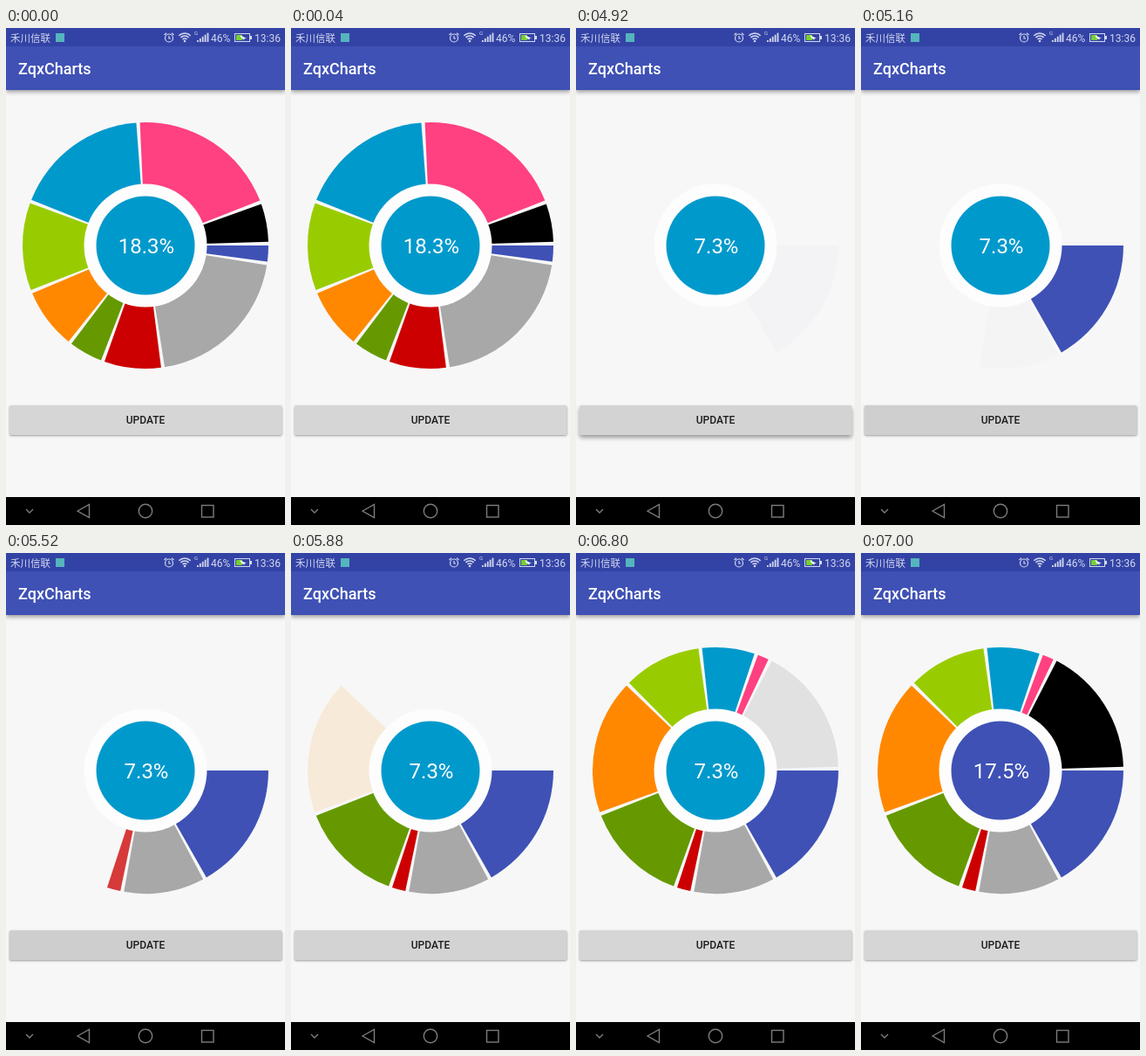
Write an HTML page with a canvas that moves like this. It is 320 px wide and 569 px high and loops after 8 s.

```html
<!DOCTYPE html>
<html lang="en">
<head>
<meta charset="utf-8">
<title>ZqxCharts</title>
<style>
html, body { margin: 0; width: 100%; height: 100%; overflow: hidden; background: #f7f7f7; }
canvas { display: block; width: 100%; height: 100%; }
</style>
</head>
<body>
<canvas id="stage"></canvas>
<script>
const W = 320, H = 569, LOOP = 8000;
const CX = 160, CY = 249, GAP = 1.7;
const PRESS = 4760, CLEAR = 4880, FADE_START = 4900, SLICE_MS = 232, SELECT = 7000;

const COLORS = ['#3f51b5', '#a8a8a8', '#cc0000', '#669900', '#ff8800',
                '#99cc00', '#0099cc', '#ff4081', '#000000'];
// Slice start angles in degrees, clockwise from three o'clock.
const BEFORE = [0, 9.2, 82.7, 111.2, 128.8, 158.8, 201.8, 267.4, 340.3, 360];
const AFTER = [0, 62, 101.8, 109.9, 160.2, 225.3, 263.7, 290.2, 297.2, 360];

const canvas = document.getElementById('stage');
const ctx = canvas.getContext('2d');
const scale = window.devicePixelRatio || 1;
canvas.width = W * scale;
canvas.height = H * scale;

const clamp = x => Math.min(1, Math.max(0, x));
const ease = x => (1 - Math.cos(Math.PI * clamp(x))) / 2;
const rad = deg => deg * Math.PI / 180;

function rect(x, y, w, h, color) {
  ctx.fillStyle = color;
  ctx.fillRect(x, y, w, h);
}

function disc(x, y, r, color) {
  ctx.fillStyle = color;
  ctx.beginPath();
  ctx.arc(x, y, r, 0, 2 * Math.PI);
  ctx.fill();
}

function ring(x, y, r, from = 0, to = 360) {
  ctx.beginPath();
  ctx.arc(x, y, r, rad(from), rad(to));
  ctx.stroke();
}

function line(points, close) {
  ctx.beginPath();
  for (const [x, y] of points) ctx.lineTo(x, y);
  if (close) ctx.closePath();
  ctx.stroke();
}

function label(text, x, y, size, color, weight = 400, align = 'left', family = 'Roboto') {
  ctx.font = `${weight} ${size}px ${family}, sans-serif`;
  ctx.textAlign = align;
  ctx.fillStyle = color;
  ctx.fillText(text, x, y);
}

function shadow(color, blur, dy) {
  ctx.shadowColor = color;
  ctx.shadowBlur = blur * scale;
  ctx.shadowOffsetY = dy * scale;
}

function drawStatusBar() {
  const ink = '#d3d8ee';
  rect(0, 0, W, 21, '#3343a5');
  label('禾川信联', 5, 16, 11.5, ink, 400, 'left', '"Noto Sans CJK SC", "Noto Sans CJK"');
  rect(57, 6, 10, 10, '#55b5bd');

  ctx.strokeStyle = ink;
  ctx.lineWidth = 1.2;
  ring(187, 11.5, 4.5);
  line([[187, 9], [187, 12], [189, 12]]);
  line([[181.5, 8], [184, 5.7]]);
  line([[192.5, 8], [190, 5.7]]);

  ctx.lineWidth = 1.5;
  for (const r of [3.5, 6.5, 9.5]) ring(205, 15.5, r, 225, 315);
  disc(205, 15, 1.3, ink);

  label('G', 216, 8, 6, ink);
  for (let i = 0; i < 5; i++) rect(219 + i * 2.9, 14 - i * 2.1, 1.8, 2 + i * 2.1, ink);
  label('46%', 235, 15.5, 12, ink);

  ctx.lineWidth = 1;
  ctx.strokeRect(262.5, 6.5, 17, 9);
  rect(280, 9, 2, 4, ink);
  rect(264, 8, 7, 6, '#76cf32');
  ctx.fillStyle = '#fff';
  ctx.beginPath();
  for (const [x, y] of [[268, 8], [272, 10], [276, 12], [273, 12], [274, 14], [270, 11.5]]) ctx.lineTo(x, y);
  ctx.fill();
  label('13:36', 315, 15.5, 12, ink, 400, 'right');
}

function drawAppBar() {
  shadow('rgba(0,0,0,.4)', 5, 2);
  rect(0, 21, W, 50, '#3f51b5');
  shadow('transparent', 0, 0);
  label('ZqxCharts', 14, 53, 18, '#fff', 500);
}

function drawSlice(starts, i, alpha) {
  ctx.globalAlpha = alpha;
  ctx.fillStyle = COLORS[i];
  ctx.beginPath();
  ctx.moveTo(CX, CY);
  ctx.arc(CX, CY, 141, rad(starts[i]), rad(starts[i + 1] - GAP));
  ctx.fill();
  ctx.globalAlpha = 1;
}

function drawChart(t) {
  const updated = t >= CLEAR, selected = t >= SELECT;
  COLORS.forEach((_, i) => {
    if (updated) drawSlice(AFTER, i, ease((t - FADE_START) / SLICE_MS - i));
    else drawSlice(BEFORE, i, 1);
  });
  disc(CX, CY, 70.5, '#fdfdfd');
  disc(CX, CY, 56.5, selected ? COLORS[0] : COLORS[6]);
  label(selected ? '17.5%' : updated ? '7.3%' : '18.3%', CX + 1, 258, 24, '#fff', 400, 'center');
}

function drawButton(t) {
  const lift = clamp((t - PRESS) / 100) * (1 - clamp((t - 4960) / 120));
  const ripple = clamp((t - PRESS) / 500) * (1 - clamp((t - 5560) / 500));
  shadow('rgba(0,0,0,.38)', 2.5 + 3 * lift, 1 + 2 * lift);
  ctx.fillStyle = '#d6d6d6';
  ctx.beginPath();
  ctx.roundRect(4, 432, 312.5, 34, 2);
  ctx.fill();
  shadow('transparent', 0, 0);
  ctx.fillStyle = `rgba(0,0,0,${0.04 * ripple})`;
  ctx.fill();
  label('UPDATE', CX, 453, 12, '#1c1c1c', 500, 'center');
}

function drawNavBar() {
  rect(0, 537, W, 32, '#000');
  ctx.strokeStyle = '#7c7c7c';
  ctx.lineWidth = 1.4;
  line([[23, 551], [27, 555], [31, 551]]);
  line([[82, 553], [95.5, 545.5], [95.5, 560.5]], true);
  ring(160, 553, 7.7);
  ctx.strokeRect(224.5, 546.5, 13.5, 13.5);
}

function draw(now) {
  const t = now % LOOP;
  ctx.setTransform(scale, 0, 0, scale, 0, 0);
  rect(0, 0, W, H, '#f7f7f7');
  drawAppBar();
  drawStatusBar();
  drawChart(t);
  drawButton(t);
  drawNavBar();
}

const startTime = performance.now();
function tick() {
  draw(performance.now() - startTime);
  requestAnimationFrame(tick);
}
tick();
</script>
</body>
</html>
```
